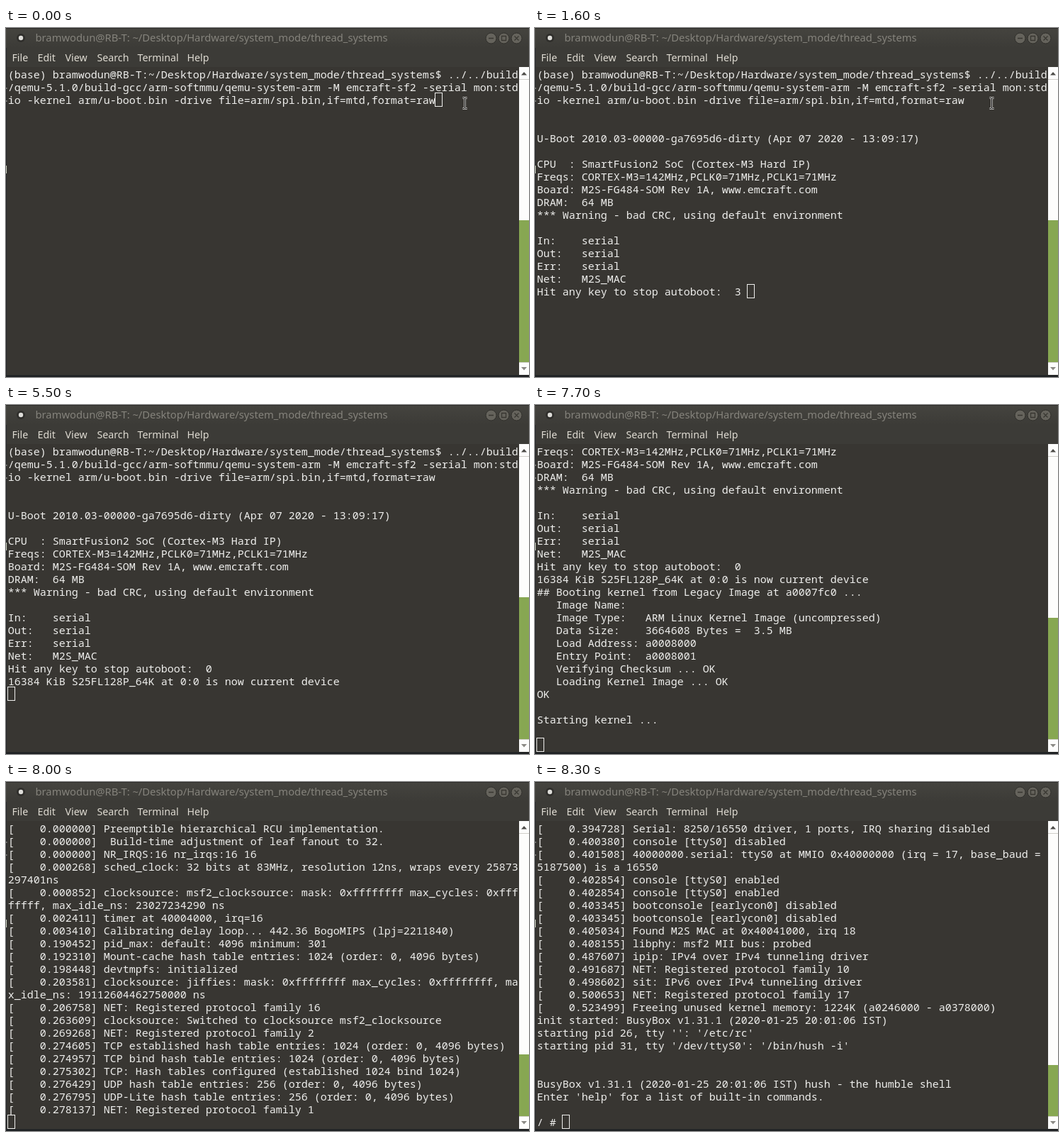
An HTML page for the animation above (9900 ms loop, 738 by 492 pixels).

```html
<!DOCTYPE html>
<html lang="en">
<head>
<meta charset="utf-8">
<title>Terminal</title>
<style>
  html, body { margin: 0; width: 100%; height: 100%; overflow: hidden; background: #383632; }
  svg { display: block; width: 738px; height: 492px; }
  text { white-space: pre; }
  .ui { font-family: "Noto Sans", "Open Sans", sans-serif; font-size: 14.2px; fill: #dfdbd2; }
  #title { font-size: 14.75px; }
  #rows { font-family: "Noto Sans Mono", "DejaVu Sans Mono", monospace; font-size: 15px; fill: #eeeeec; }
  .glyph { fill: none; stroke: #383731; stroke-width: 1.3; }
</style>
</head>
<body>
<svg viewBox="0 0 738 492" xmlns="http://www.w3.org/2000/svg">
  <defs>
    <linearGradient id="bar" x2="0" y2="1">
      <stop offset="0" stop-color="#45443f"/>
      <stop offset="1" stop-color="#3c3b37"/>
    </linearGradient>
  </defs>
  <rect width="738" height="492" fill="#3c3b37"/>
  <rect width="738" height="28" fill="url(#bar)"/>
  <rect width="738" height="1" fill="#2c2b28"/>
  <rect y="55" width="724" height="435" fill="#383632"/>
  <circle cx="21" cy="14" r="6" fill="#2f2e2b"/>
  <circle cx="21" cy="14" r="3.2" fill="#deddd9"/>
  <text id="title" class="ui" x="41.5" y="19"></text>
  <g id="menu" class="ui"></g>

  <g fill="#65635c" stroke="#302f2b">
    <circle cx="684.5" cy="14.5" r="7.5"/>
    <circle cx="702.5" cy="14.5" r="7.5"/>
    <circle id="close" cx="720.5" cy="14.5" r="7.5"/>
  </g>
  <path class="glyph" d="M681 14.5h7M699.5 11.5h6v6h-6zM717.5 11.5l6 6m0-6l-6 6"/>

  <g id="rows"></g>
  <rect id="caret" width="10" height="19" stroke="#eeeeec"/>

  <rect x="724" y="55" width="14" height="434" fill="#fdfdfc"/>
  <path d="M724 72.5h14M724 471.5h14" stroke="#d0cec9"/>
  <path d="M727 66.5l4-4.500 4 4.500z" fill="#4c4b47"/>
  <path d="M727 478l4 4.500 4-4.500z" fill="#8b8a85"/>
  <rect id="thumb" x="724" width="14" fill="#87a752"/>

  <rect y="28" width="1" height="462" fill="#24262a"/>
  <rect y="489.500" width="738" height="2.500" fill="#1d2023"/>
  <path d="M0 85h1.500M0 103h1.500" stroke="#c5c4bf"/>
  <rect y="194" width="1" height="11" fill="#c9d0c0"/>

  <g id="mouse" fill="none">
    <path id="beam" d="M-3 -7.500H-1.500Q0 -7.500 0 -6Q0 -7.500 1.500 -7.500H3M0 -6V6M-3 7.500H-1.500Q0 7.500 0 6Q0 7.500 1.500 7.500H3" stroke="#f4f4f2" stroke-width="2.300"/>
    <use href="#beam" style="display:none"/>
    <path d="M-3 -7.500H-1.500Q0 -7.500 0 -6Q0 -7.500 1.500 -7.500H3M0 -6V6M-3 7.500H-1.500Q0 7.500 0 6Q0 7.500 1.500 7.500H3" stroke="#111"/>
  </g>
</svg>
<script>
const LOOP = 9900, TICK = 100, ROWS = 24, COLS = 80;
const LEFT = 2, TOP = 56, CELL = 9, LINE = 18;
const HISTORY = 24;
const TRACK_TOP = 72.5, TRACK_END = 471;
const user = 'bramwodun@RB-T';
const folder = '~/Desktop/Hardware/system_mode/thread_systems';

// Output chunks by time; a leading number on a line is a kernel timestamp.
const chunks = [
[0, `(base) ${user}:${folder}$ ../../build/qemu-5.1.0/build-gcc/arm-softmmu/qemu-system-arm -M emcraft-sf2 -serial mon:stdio -kernel arm/u-boot.bin -drive file=arm/spi.bin,if=mtd,format=raw`],
[800, '\n'],
[1000, `

U-Boot 2010.03-00000-ga7695d6-dirty (Apr 07 2020 - 13:09:17)

CPU  : SmartFusion2 SoC (Cortex-M3 Hard IP)
Freqs: CORTEX-M3=142MHz,PCLK0=71MHz,PCLK1=71MHz
Board: M2S-FG484-SOM Rev 1A, www.emcraft.com
DRAM:  64 MB
*** Warning - bad CRC, using default environment

In:    serial
Out:   serial
Err:   serial
Net:   M2S_MAC
Hit any key to stop autoboot:  # `],
[4100, `
16384 KiB S25FL128P_64K at 0:0 is now current device
`],
[7700, `## Booting kernel from Legacy Image at a0007fc0 ...
   Image Name:
   Image Type:   ARM Linux Kernel Image (uncompressed)
   Data Size:    3664608 Bytes =  3.5 MB
   Load Address: a0008000
   Entry Point:  a0008001
   Verifying Checksum ... OK
   Loading Kernel Image ... OK
OK

Starting kernel ...

`],
[7800, `0.000000 Booting Linux on physical CPU 0x0
0.000000 Linux version 4.5.0 #1 PREEMPT
0.000000 CPU: ARMv7-M [410fc231] revision 1 (ARMv7M), cr=00000000
0.000000 CPU: unknown data cache, unknown instruction cache
0.000000 Machine model: M2S-FG484-SOM
0.000000 bootconsole [earlycon0] enabled
0.000000 On node 0 totalpages: 16384
0.000000   Normal zone: 128 pages used for memmap
0.000000   Normal zone: 0 pages reserved
0.000000   Normal zone: 16384 pages, LIFO batch:3
0.000000 pcpu-alloc: s0 r0 d32768 u32768 alloc=1*32768
0.000000 pcpu-alloc: [0] 0
0.000000 Built 1 zonelists in Zone order, mobility grouping on.  Total pages: 16256
0.000000 Kernel command line: console=ttyS0,115200n8 earlyprintk
0.000000 PID hash table entries: 256 (order: -2, 1024 bytes)
`],
[7900, `0.000000 Dentry cache hash table entries: 8192 (order: 3, 32768 bytes)
0.000000 Inode-cache hash table entries: 4096 (order: 2, 16384 bytes)
0.000000 Memory: 61212K/65536K available (1612K kernel code, 75K rwdata, 680K rodata, 1224K init, 120K bss, 4324K reserved, 0K cma-reserved)
0.000000 Virtual kernel memory layout:
0.000000     vector  : 0x00000000 - 0x00001000   (   4 kB)
0.000000     fixmap  : 0xffc00000 - 0xfff00000   (3072 kB)
0.000000     vmalloc : 0x00000000 - 0xffffffff   (4095 MB)
0.000000     lowmem  : 0xa0000000 - 0xa4000000   (  64 MB)
0.000000     modules : 0xa0000000 - 0xa0800000   (   8 MB)
0.000000       .text : 0xa0008000 - 0xa02453e8   (2293 kB)
0.000000       .init : 0xa0246000 - 0xa0378000   (1224 kB)
0.000000       .data : 0xa0378000 - 0xa038ace0   (  76 kB)
0.000000        .bss : 0xa038ace0 - 0xa03a8ea0   ( 121 kB)
0.000000 SLUB: HWalign=32, Order=0-3, MinObjects=0, CPUs=1, Nodes=1
0.000000 Preemptible hierarchical RCU implementation.
0.000000  Build-time adjustment of leaf fanout to 32.
0.000000 NR_IRQS:16 nr_irqs:16 16
0.000268 sched_clock: 32 bits at 83MHz, resolution 12ns, wraps every 25873297401ns
0.000852 clocksource: msf2_clocksource: mask: 0xffffffff max_cycles: 0xffffffff, max_idle_ns: 23027234290 ns
0.002411 timer at 40004000, irq=16
0.003410 Calibrating delay loop... `],
[8000, `442.36 BogoMIPS (lpj=2211840)
0.190452 pid_max: default: 4096 minimum: 301
0.192310 Mount-cache hash table entries: 1024 (order: 0, 4096 bytes)
0.198448 devtmpfs: initialized
0.203581 clocksource: jiffies: mask: 0xffffffff max_cycles: 0xffffffff, max_idle_ns: 19112604462750000 ns
0.206758 NET: Registered protocol family 16
0.263609 clocksource: Switched to clocksource msf2_clocksource
0.269268 NET: Registered protocol family 2
0.274605 TCP established hash table entries: 1024 (order: 0, 4096 bytes)
0.274957 TCP bind hash table entries: 1024 (order: 0, 4096 bytes)
0.275302 TCP: Hash tables configured (established 1024 bind 1024)
0.276429 UDP hash table entries: 256 (order: 0, 4096 bytes)
0.276795 UDP-Lite hash table entries: 256 (order: 0, 4096 bytes)
0.278137 NET: Registered protocol family 1
`],
[8100, `0.393526 io scheduler noop registered (default)
0.394728 Serial: 8250/16550 driver, 1 ports, IRQ sharing disabled
0.400380 console [ttyS0] disabled
0.401508 40000000.serial: ttyS0 at MMIO 0x40000000 (irq = 17, base_baud = 5187500) is a 16550
0.402854 console [ttyS0] enabled
0.402854 console [ttyS0] enabled
0.403345 bootconsole [earlycon0] disabled
0.403345 bootconsole [earlycon0] disabled
0.405034 Found M2S MAC at 0x40041000, irq 18
0.408155 libphy: msf2 MII bus: probed
`],
[8200, `0.487607 ipip: IPv4 over IPv4 tunneling driver
0.491687 NET: Registered protocol family 10
0.498602 sit: IPv6 over IPv4 tunneling driver
0.500653 NET: Registered protocol family 17
`],
[8300, `0.523499 Freeing unused kernel memory: 1224K (a0246000 - a0378000)
init started: BusyBox v1.31.1 (2020-01-25 20:01:06 IST)
starting pid 26, tty '': '/etc/rc'
starting pid 31, tty '/dev/ttyS0': '/bin/hush -i'


BusyBox v1.31.1 (2020-01-25 20:01:06 IST) hush - the humble shell
Enter 'help' for a list of built-in commands.

/ # `]
];

const $ = id => document.getElementById(id);

function addText(parent, x, y, content = '') {
  const el = document.createElementNS('http://www.w3.org/2000/svg', 'text');
  el.setAttribute('x', x);
  el.setAttribute('y', y);
  el.textContent = content;
  parent.appendChild(el);
  return el;
}

function set(el, attrs) {
  for (const name in attrs) el.setAttribute(name, attrs[name]);
}

$('title').textContent = `${user}: ${folder}`;
[['File', 8.5], ['Edit', 44.5], ['View', 83.5], ['Search', 128.5], ['Terminal', 185.5], ['Help', 255.5]]
  .forEach(([name, x]) => addText($('menu'), x, 47, name));
const rowEls = Array.from({ length: ROWS }, (_, i) => addText($('rows'), LEFT + 0.8, TOP + 15 + i * LINE));

function wrap(line) {
  const parts = [];
  for (let i = 0; i === 0 || i < line.length; i += COLS) parts.push(line.slice(i, i + COLS));
  return parts;
}

function screenRows(t) {
  const count = t < 2000 ? 3 : t < 3100 ? 2 : t < 4100 ? 1 : 0;
  return chunks.filter(c => c[0] <= t).map(c => c[1]).join('')
    .replace('autoboot:  #', 'autoboot:  ' + count)
    .replace(/^\d\.\d{6}/gm, '[    $&]')
    .split('\n').flatMap(wrap);
}

// The pointer hides while typing, then sweeps left across the text.
function pointer(t) {
  if (t < 800) return [647.5, 106];
  if (t < 1600 || t >= 5500) return null;
  if (t <= 2000) {
    const p = (t - 1600) / 400, e = p * p * (3 - 2 * p);
    return [644.5 - 248 * e, 106 - 44 * e];
  }
  if (t < 2400) return [396.5, 62];
  if (t < 2700) return [396.5, 76.5];
  return [375.5, t < 5400 ? 81 : 79];
}

function draw(t) {
  const rows = screenRows(t);
  const top = Math.max(0, rows.length - ROWS);
  rowEls.forEach((el, i) => { el.textContent = rows[top + i] || ''; });

  const focused = t >= 200 && t < 900;
  const last = rows.length - 1;
  set($('caret'), {
    x: LEFT + rows[last].length * CELL + 0.5,
    y: TOP + (last - top) * LINE - 0.5,
    fill: focused ? '#eeeeec' : 'none'
  });
  $('title').style.fill = focused ? '#dfdbd2' : '#85837c';
  $('close').style.fill = focused ? '#e2582c' : '';

  const total = HISTORY + Math.max(ROWS, rows.length);
  const size = (TRACK_END - TRACK_TOP) * ROWS / total;
  const thumbTop = Math.floor(TRACK_END - size);
  set($('thumb'), { y: thumbTop, height: TRACK_END - thumbTop });

  const at = pointer(t);
  set($('mouse'), at
    ? { visibility: 'visible', transform: `translate(${at})` }
    : { visibility: 'hidden' });
}

const start = performance.now();
let shown = -1;
function frame() {
  const t = Math.floor((performance.now() - start) % LOOP / TICK) * TICK;
  if (t !== shown) draw(shown = t);
  requestAnimationFrame(frame);
}
frame();
</script>
</body>
</html>
```
